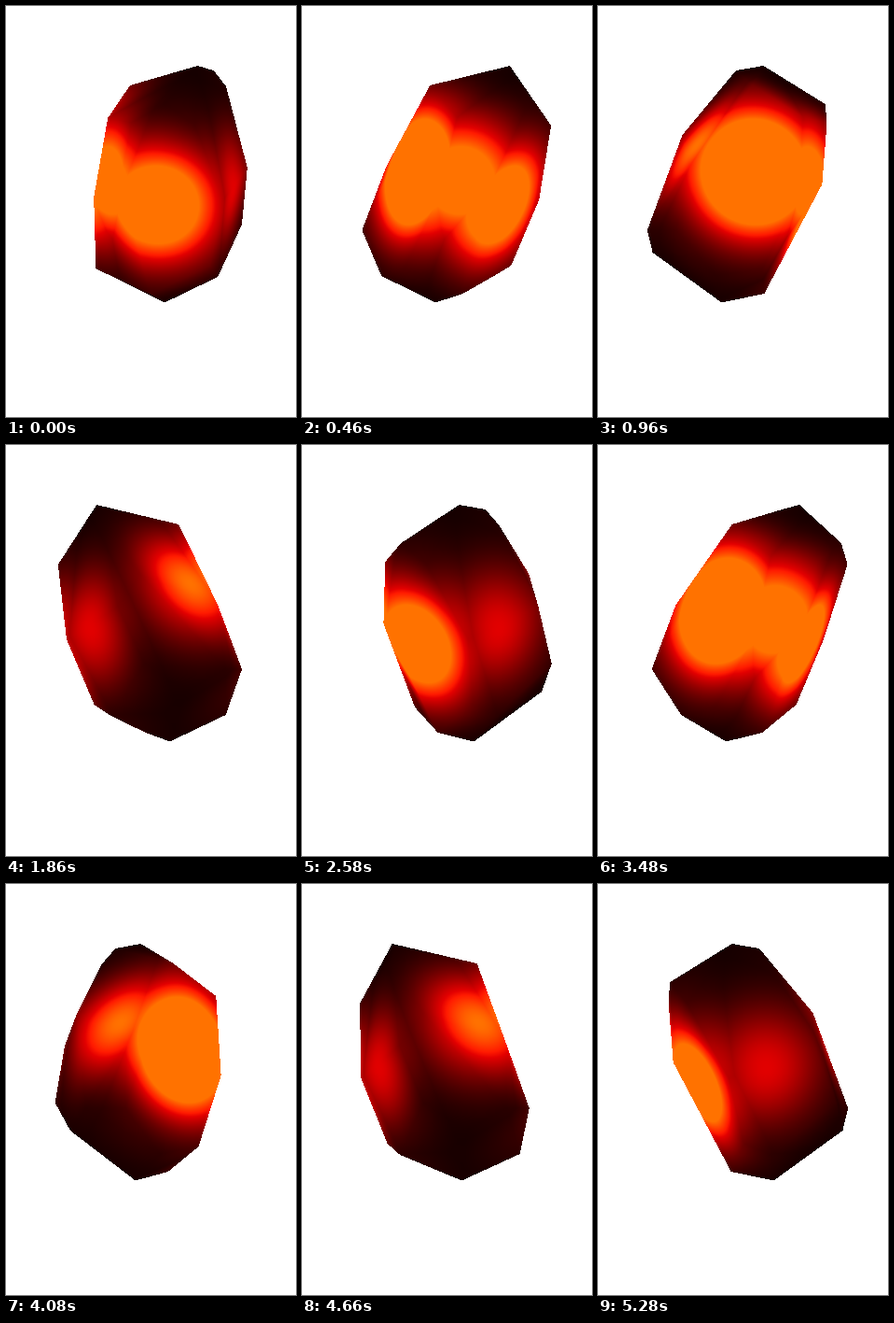
Recreate the animation shown at these times as an HTML page with a canvas. Size 311x440 px, loop 5300 ms.

```html
<!DOCTYPE html>
<html lang="en">
<head>
<meta charset="utf-8">
<title>Glowing stone</title>
<style>
  html, body { margin: 0; width: 100%; height: 100%; overflow: hidden; background: #fff; }
  canvas { display: block; }
</style>
</head>
<body>
<canvas id="stage" width="311" height="440"></canvas>
<script>
const LOOP = 5300, STEP = 20, START = -110, DEG_PER_MS = 0.125;
const AXIS = 160.5, GIRTH = 1.012, GLOW_SIZE = 66, GLOW_DEPTH = 0.95;

// Key corners of the stone: height, then position across the upright axis.
const corners = [
  [64, 27, -57], [69, -1, -65], [85, 0, 29], [86, -12, -75],
  [105, 91, -43], [128, 78, -73], [125, 86, -4], [120, 55, 34],
  [138, -60, -58], [173, -56, -83], [171, -69, 34], [205, 46, 53],
  [191, 78, 12], [208, 36, -89], [240, -111, 17], [234, -83, -67],
  [240, -87, 53], [264, -98, -24], [278, 16, -67], [281, 4, 66],
  [289, -44, 60], [290, -14, -65], [308, 18, -1], [317.5, -28, 0]
].map(([y, c, s]) => [y, c * GIRTH, s * GIRTH]);

// One hot spot per side face.
const glows = [
  { height: 212, bearing: -21, power: 2.25 },
  { height: 196, bearing: -93, power: 0.88 },
  { height: 178, bearing: 91, power: 3 },
  { height: 187, bearing: 29, power: 1.9 },
  { height: 150, bearing: 172, power: 1.4 }
];

const radians = deg => deg * Math.PI / 180;
const clamp = v => Math.max(0, Math.min(1, v));
const sub = (a, b) => a.map((v, i) => v - b[i]);
const dot = (a, b) => a[0] * b[0] + a[1] * b[1] + a[2] * b[2];
const cross = (a, b) => [
  a[1] * b[2] - a[2] * b[1],
  a[2] * b[0] - a[0] * b[2],
  a[0] * b[1] - a[1] * b[0]
];

// Every triple with all other corners on one side is a facet.
function hullFacets(points) {
  const facets = [], n = points.length;
  for (let i = 0; i < n; i++)
    for (let j = i + 1; j < n; j++)
      for (let k = j + 1; k < n; k++) {
        const normal = cross(sub(points[j], points[i]), sub(points[k], points[i]));
        const sides = points.map(p => dot(normal, sub(p, points[i])));
        const above = sides.some(d => d > 1e-6), below = sides.some(d => d < -1e-6);
        if (above && below) continue;
        facets.push({ ids: [i, j, k], outward: normal.map(v => above ? -v : v) });
      }
  return facets;
}

const facets = hullFacets(corners);

// Follows a bearing from the axis out to the surface.
function surfacePoint({ height, bearing }) {
  const from = [height, 0, 0];
  const ray = [0, Math.cos(radians(bearing)), Math.sin(radians(bearing))];
  const reach = Math.min(...facets
    .filter(f => dot(f.outward, ray) > 0)
    .map(f => dot(f.outward, sub(corners[f.ids[0]], from)) / dot(f.outward, ray)));
  return from.map((v, i) => v + ray[i] * reach * GLOW_DEPTH);
}

for (const glow of glows) glow.place = surfacePoint(glow);

const ctx = document.getElementById('stage').getContext('2d');
const { width: W, height: H } = ctx.canvas;
const image = ctx.createImageData(W, H);
const pixels = new Uint32Array(image.data.buffer);

function turn([y, c, s], cos, sin) {
  return [AXIS + c * cos + s * sin, y, s * cos - c * sin];
}

function shade(x, y, z, spots) {
  let heat = 0;
  for (const { at, power } of spots) {
    const dx = x - at[0], dy = y - at[1], dz = z - at[2];
    const d2 = (dx * dx + dy * dy + dz * dz) / (GLOW_SIZE * GLOW_SIZE);
    heat = Math.max(heat, power * Math.exp(-d2));
  }
  const red = 18 + 237 * clamp(heat);
  const green = 114 * clamp((heat - 0.88) / 0.52);
  return (0xff000000 | green << 8 | red) >>> 0;
}

function fillTriangle(a, b, c, spots) {
  const area = (b[0] - a[0]) * (c[1] - a[1]) - (b[1] - a[1]) * (c[0] - a[0]);
  if (Math.abs(area) < 1e-6) return;
  const xs = [a[0], b[0], c[0]], ys = [a[1], b[1], c[1]];
  const left = Math.floor(Math.min(...xs)), right = Math.ceil(Math.max(...xs));
  const top = Math.floor(Math.min(...ys)), bottom = Math.ceil(Math.max(...ys));
  for (let y = top; y <= bottom; y++)
    for (let x = left; x <= right; x++) {
      const px = x + 0.5 - a[0], py = y + 0.5 - a[1];
      const v = (px * (c[1] - a[1]) - py * (c[0] - a[0])) / area;
      const w = (py * (b[0] - a[0]) - px * (b[1] - a[1])) / area;
      if (v < -1e-6 || w < -1e-6 || v + w > 1 + 1e-6) continue;
      const z = a[2] + v * (b[2] - a[2]) + w * (c[2] - a[2]);
      pixels[y * W + x] = shade(x + 0.5, y + 0.5, z, spots);
    }
}

function draw(ms) {
  const angle = radians(START + DEG_PER_MS * ms);
  const cos = Math.cos(angle), sin = Math.sin(angle);
  const points = corners.map(p => turn(p, cos, sin));
  const spots = glows.map(({ place, power }) => ({ at: turn(place, cos, sin), power }));
  pixels.fill(0xffffffff);
  for (const { ids, outward } of facets) {
    const facing = outward[2] * cos - outward[1] * sin;
    if (facing > 0) fillTriangle(...ids.map(i => points[i]), spots);
  }
  ctx.putImageData(image, 0, 0);
}

const begin = performance.now();
let shown = -1;
function tick() {
  const ms = Math.floor((performance.now() - begin) % LOOP / STEP) * STEP;
  if (ms !== shown) draw(shown = ms);
  requestAnimationFrame(tick);
}
tick();
</script>
</body>
</html>
```
